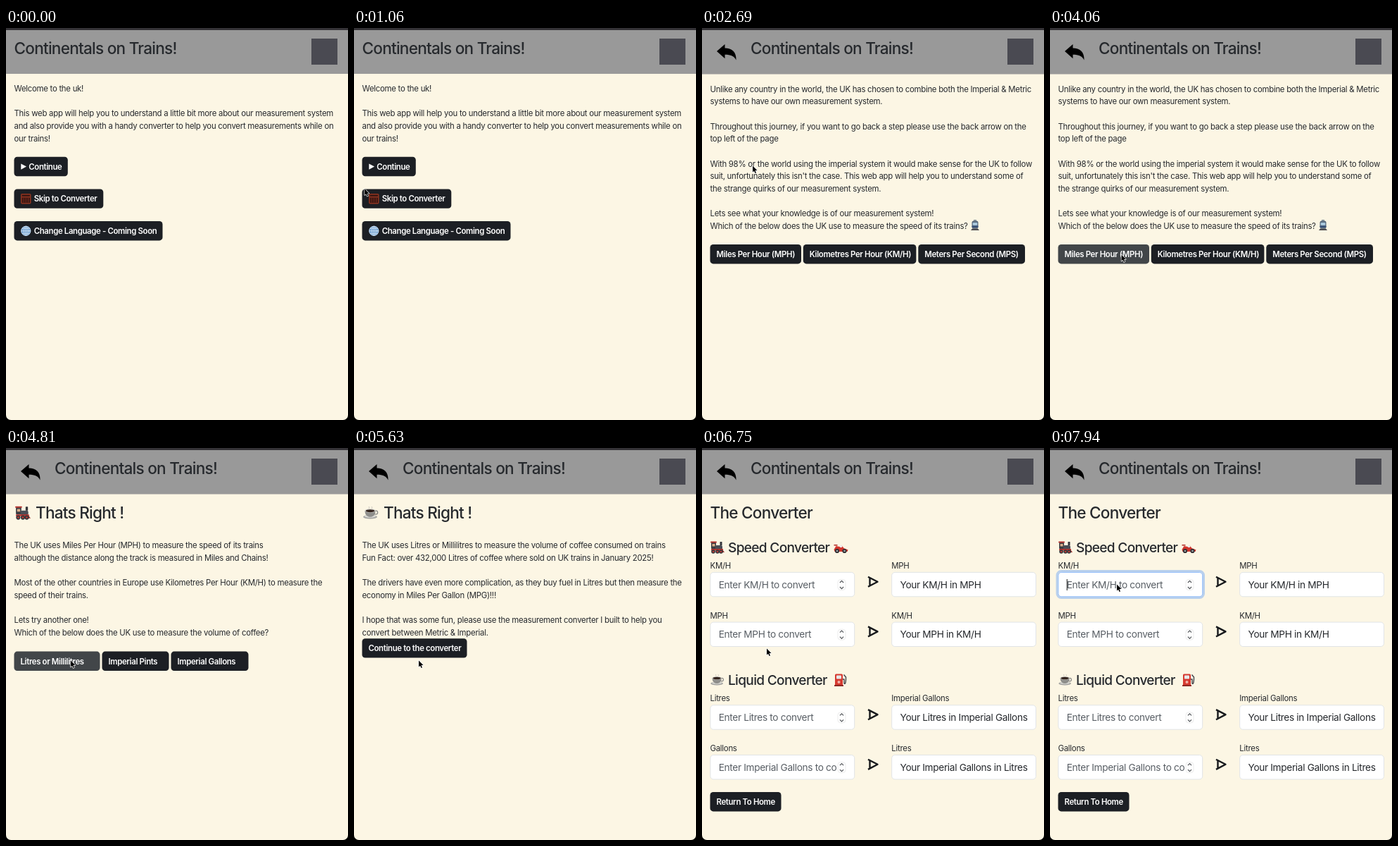
An HTML page with a canvas that plays this animation: 486x556 px, repeating every 8000 ms.

```html
<!DOCTYPE html>
<html lang="en">
<head>
<meta charset="utf-8">
<title>Rail measurement guide</title>
<style>
html, body { margin: 0; width: 100%; height: 100%; overflow: hidden; background: #000; }
canvas { display: block; width: 486px; height: 556px; }
</style>
</head>
<body>
<canvas id="stage"></canvas>
<script>
const W = 486, H = 556, LOOP = 8000, LINE = 17.68;
const canvas = document.getElementById('stage');
const ctx = canvas.getContext('2d');
const dpr = window.devicePixelRatio || 1;
canvas.width = W * dpr;
canvas.height = H * dpr;

const INK = '#26292d', CREAM = '#fcf6e4';

// font size, weight, tracking in em
const STYLES = {
  body: [11.4, 400, -0.0235],
  button: [11.4, 600, -0.031],
  title: [22.6, 500, -0.034],
  section: [19.1, 500, -0.036],
  input: [13.7, 400, -0.0255]
};

function text(str, x, y, style = 'body', color = INK) {
  const [size, weight, track] = STYLES[style];
  ctx.font = `${weight} ${size}px Inter, sans-serif`;
  ctx.letterSpacing = `${size * track}px`;
  ctx.fillStyle = color;
  ctx.fillText(str, x, y);
}

function lines(list, y) {
  list.forEach((s, i) => s && text(s, 11.5, y + i * LINE));
}

function box(x, y, w, h, r, fill, stroke, width = 1) {
  ctx.beginPath();
  ctx.roundRect(x, y, w, h, r);
  if (fill) { ctx.fillStyle = fill; ctx.fill(); }
  if (stroke) { ctx.strokeStyle = stroke; ctx.lineWidth = width; ctx.stroke(); }
}

function oval(x, y, rx, ry, fill) {
  ctx.beginPath();
  ctx.ellipse(x, y, rx, ry, 0, 0, 7);
  ctx.fillStyle = fill;
  ctx.fill();
}

function path(d, fill, stroke, width = 1) {
  const p = new Path2D(d);
  if (fill) { ctx.fillStyle = fill; ctx.fill(p); }
  if (stroke) { ctx.strokeStyle = stroke; ctx.lineWidth = width; ctx.stroke(p); }
}

// Icons are drawn around their own centre
const icons = {
  play() { path('M-3.7-4.1L4 0L-3.7 4.1Z', '#fff'); },
  abacus() {
    box(-6.5, -6.5, 13, 13, 1, '#3a1712', '#8f3420', 1.5);
    path('M-6-2.5H6', null, '#a33d25', 1.2);
    path('M-3.2-1.5V5.5M0-1.5V5.5M3.2-1.5V5.5', null, '#7a2b1c');
  },
  globe() {
    oval(0, 0, 7, 7, '#6f9fd0');
    ctx.beginPath();
    ctx.ellipse(0, 0, 6.6, 6.6, 0, 0, 7);
    ctx.ellipse(0, 0, 3, 6.6, 0, 0, 7);
    ctx.strokeStyle = '#d5e6f5';
    ctx.lineWidth = 0.8;
    ctx.stroke();
    path('M-6.6 0H6.6M0-6.6V6.6M-5.5-3.5H5.5M-5.5 3.5H5.5', null, '#d5e6f5', 0.8);
  },
  tram() {
    box(-4.5, -6.5, 9, 11, 2.5, '#56697c');
    box(-3.3, -4, 6.6, 4, 1, '#a9c8dc');
    box(-4.5, 0.8, 9, 1.6, 0, '#2f4a78');
    path('M-4 4.5L-6 7H6L4 4.5', '#4b4b4f');
    path('M-2-7.2H2', null, '#56697c', 1.2);
  },
  coffee() {
    oval(-1, 5.8, 10, 2.8, '#a3a3a0');
    oval(-1, 5, 8, 1.8, '#d9d9d5');
    ctx.beginPath();
    ctx.ellipse(7, -0.5, 2.6, 2.6, 0, 0, 7);
    ctx.strokeStyle = '#8f8f8c';
    ctx.lineWidth = 1.4;
    ctx.stroke();
    path('M-8.5-3C-8.5 3-5 5.8-1 5.8S6.5 3 6.5-3Z', '#8e8e8b');
    oval(-1, -3, 7.5, 2.7, '#cfcfcb');
    oval(-1, -2.8, 6.4, 2, '#34251e');
    path('M-3-6q1.5-1.5 0-3M1-6q1.5-1.5 0-3', null, '#c9c6bd');
  },
  engine() {
    box(-9, -7, 7, 9, 1, '#3b3d43');
    box(-7.5, -5, 4, 3.5, 0.5, '#d9b08c');
    box(-10, -8.5, 9, 2, 1, '#b3322d');
    box(-3, -3, 10, 6, 2, '#4a4d55');
    box(3.5, -8, 3, 5, 0.5, '#33353a');
    box(-9, 2, 17, 2.4, 0.5, '#bb342e');
    path('M7 3L10 7H5Z', '#9c2c28');
    [-6, 0, 5].forEach(x => { oval(x, 6, 2.8, 2.8, '#34363b'); oval(x, 6, 1.3, 1.3, '#bb3a33'); });
  },
  racer() {
    path('M-10 2L-7-3L-2-2L1-4L4 0L10 2.5L9 5H-9Z', '#d2352c');
    path('M-10-5H-5V-3.5H-10Z', '#b02922');
    oval(0, -2.5, 2, 1.8, '#eee');
    [-5.5, 5].forEach(x => { oval(x, 4, 3.1, 3.1, '#2f3034'); oval(x, 4, 1.3, 1.3, '#a5a7ab'); });
  },
  pump() {
    box(-7.5, -8.5, 11, 17, 1.5, '#d63a30');
    box(-5.5, -6.5, 7, 5, 0.8, '#e6e8e9');
    box(-8.5, 7, 13, 2, 0.5, '#8d2621');
    path('M3.5-1H5.5V5Q7.5 7 8-0.5V-4L5-7.5', null, '#42444a', 1.4);
    oval(-2, 3, 2, 2, '#f1b3a9');
  },
  back() {
    path('M-14-1.5L-2.5-11.5V-6C7-6 14-1 13.5 11C10.5 5 6 3.2-2.5 3.2V8.8Z', '#000');
  },
  convert() {
    path('M-5.5-7.3L8-0.3L-5.5 6.8M-3-6V5.4', null, '#17191c', 2.4);
  }
};

function icon(name, x, y, scale = 1) {
  ctx.save();
  ctx.translate(x, y);
  ctx.scale(scale, scale);
  ctx.lineJoin = 'round';
  icons[name]();
  ctx.restore();
}

const clamp = v => Math.max(0, Math.min(1, v));

const FOCUS_AT = 7540;

function input(x, y, label, hint, editable, focus = 0) {
  text(label, x, y - 5);
  if (focus) box(x - 1.5, y - 1.5, 208.5, 38, 6, null, `rgba(13,110,253,${0.28 * focus})`, 3);
  box(x + 0.4, y + 0.4, 204.8, 34.4, 4.4, '#fff', focus ? '#86b7fe' : '#dee2e6', 0.9);
  ctx.save();
  ctx.beginPath();
  ctx.rect(x, y, editable ? 180.5 : 205, 35);
  ctx.clip();
  text(hint, x + 12.2, y + 22.6, 'input', editable ? '#595f65' : INK);
  ctx.restore();
  if (!editable) return;
  box(x + 181.5, y + 10.5, 11, 15, 4, '#fff', '#e4e4e4', 0.7);
  const cx = x + 187, cy = y + 18;
  path(`M${cx - 2.6} ${cy - 3}l2.6-2.6l2.6 2.6M${cx - 2.6} ${cy + 3}l2.6 2.6l2.6-2.6`, null, '#55585c', 1.2);
  if (focus) { ctx.fillStyle = '#111'; ctx.fillRect(x + 12.2, y + 10, 1, 16); }
}

function field(y, from, to, fromHint, toHint, focus) {
  input(11.5, y, from, fromHint, true, focus);
  icon('convert', 241.5, y + 14);
  input(269.3, y, to, toHint, false);
}

// Buttons: x, y, width, label, optional icon
const pages = [
  {
    start: 0, hand: true,
    buttons: [
      [11.5, 182.8, 76.3, 'Continue', 'play'],
      [11.5, 228.4, 126.8, 'Skip to Converter', 'abacus'],
      [11.5, 274, 211, 'Change Language - Coming Soon', 'globe']
    ],
    draw() {
      lines(['Welcome to the uk!', '',
        'This web app will help you to understand a little bit more about our measurement system',
        'and also provide you with a handy converter to help you convert measurements while on',
        'our trains!'], 90);
    }
  },
  {
    start: 2500,
    buttons: [
      [11.5, 307, 129.5, 'Miles Per Hour (MPH)'],
      [143.8, 307, 160.6, 'Kilometres Per Hour (KM/H)'],
      [307.3, 307, 151.7, 'Meters Per Second (MPS)']
    ],
    draw() {
      lines(['Unlike any country in the world, the UK has chosen to combine both the Imperial & Metric',
        'systems to have our own measurement system.', '',
        'Throughout this journey, if you want to go back a step please use the back arrow on the',
        'top left of the page', '',
        'With 98% or the world using the imperial system it would make sense for the UK to follow',
        "suit, unfortunately this isn't the case. This web app will help you to understand some of",
        'the strange quirks of our measurement system.', '',
        'Lets see what your knowledge is of our measurement system!',
        'Which of the below does the UK use to measure the speed of its trains?'], 90.5);
      icon('tram', 388, 280);
    }
  },
  {
    start: 4130,
    buttons: [
      [11.5, 288.6, 122, 'Litres or Millilitres'],
      [136.5, 288.6, 95, 'Imperial Pints'],
      [234.5, 288.6, 110, 'Imperial Gallons']
    ],
    draw() {
      icon('engine', 24, 92, 1.1);
      text('Thats Right !', 42, 100, 'title');
      lines(['The UK uses Miles Per Hour (MPH) to measure the speed of its trains',
        'although the distance along the track is measured in Miles and Chains!', '',
        'Most of the other countries in Europe use Kilometres Per Hour (KM/H) to measure the',
        'speed of their trains.', '',
        'Lets try another one!',
        'Which of the below does the UK use to measure the volume of coffee?'], 142);
    }
  },
  {
    start: 4940,
    buttons: [[11.5, 270.2, 149, 'Continue to the converter']],
    draw() {
      icon('coffee', 24, 92);
      text('Thats Right !', 42, 100, 'title');
      lines(['The UK uses Litres or Millilitres to measure the volume of coffee consumed on trains',
        'Fun Fact: over 432,000 Litres of coffee where sold on UK trains in January 2025!', '',
        'The drivers have even more complication, as they buy fuel in Litres but then measure the',
        'economy in Miles Per Gallon (MPG)!!!', '',
        'I hope that was some fun, please use the measurement converter I built to help you',
        'convert between Metric & Imperial.'], 142);
    }
  },
  {
    start: 6560,
    buttons: [[11.5, 488, 101, 'Return To Home']],
    draw(t) {
      text('The Converter', 11.5, 100, 'title');
      icon('engine', 22, 141);
      text('Speed Converter', 37, 147.8, 'section');
      icon('racer', 197.5, 142);
      field(176, 'KM/H', 'MPH', 'Enter KM/H to convert', 'Your KM/H in MPH', clamp((t - FOCUS_AT) / 150));
      field(246.7, 'MPH', 'KM/H', 'Enter MPH to convert', 'Your MPH in KM/H');
      icon('coffee', 22, 329, 0.88);
      text('Liquid Converter', 37, 336, 'section');
      icon('pump', 196.5, 329);
      field(364.4, 'Litres', 'Imperial Gallons', 'Enter Litres to convert', 'Your Litres in Imperial Gallons');
      field(435.1, 'Gallons', 'Litres', 'Enter Imperial Gallons to convert', 'Your Imperial Gallons in Litres');
    }
  }
];

// Pointer tip: time, x, y
const MOVES = [
  [900, 3, 235], [1500, 71, 196], [2500, 71, 196], [2650, 72, 195.5], [3250, 72, 195.5],
  [3950, 101.5, 321.5], [4300, 101.5, 321.5], [4650, 92, 301.5], [5690, 92, 301.5],
  [6050, 92, 284.5], [6900, 92, 284.5], [7450, 95, 193.5]
];

function pointer(t) {
  if (t < MOVES[0][0]) return null;
  const i = MOVES.findIndex(m => m[0] > t);
  if (i < 0) return MOVES[MOVES.length - 1].slice(1);
  const [t0, x0, y0] = MOVES[i - 1], [t1, x1, y1] = MOVES[i];
  const u = (t - t0) / (t1 - t0), e = u * u * (3 - 2 * u);
  return [x0 + (x1 - x0) * e, y0 + (y1 - y0) * e];
}

const BUTTON_H = 27.4;

function over([x, y, w], p) {
  return !!p && p[0] >= x && p[0] <= x + w && p[1] >= y && p[1] <= y + BUTTON_H;
}

// Averaging the last 150 ms gives the colour transition
function hoverLevel(b, t, start) {
  let n = 0;
  for (let i = 0; i < 6; i++) {
    const s = t - i * 30;
    if (s >= start && over(b, pointer(s))) n++;
  }
  return n / 6;
}

function button(b, level) {
  const [x, y, w, label, mark] = b;
  const c = [28, 31, 36].map((v, i) => Math.round(v + ([66, 70, 73][i] - v) * level));
  box(x, y, w, BUTTON_H, 4.4, `rgb(${c})`);
  if (mark) icon(mark, x + (mark === 'play' ? 13.5 : 16.8), y + 13.8);
  const indent = !mark ? 9 : mark === 'play' ? 20.8 : 28.2;
  text(label, x + indent, y + 18, 'button', '#fff');
}

function header(withBack) {
  ctx.fillStyle = '#999';
  ctx.fillRect(0, 0, W, withBack ? 65.5 : 65);
  ctx.fillStyle = '#343236';
  ctx.fillRect(0, 0, W, 3);
  if (withBack) icon('back', 35, 34.5);
  text('Continentals on Trains!', withBack ? 69 : 11.5, 37, 'title');
  box(434, 15, 37, 37, 0, '#4a4a52');
}

function drawPointer([x, y], hand) {
  ctx.save();
  ctx.translate(x, y);
  ctx.lineJoin = 'round';
  if (hand) {
    path('M0 0Q1.2-1.2 2 .3L3 4L6 4.5Q7.3 5 7 7L6.2 11H1.5L-2 6.5Q-2-.0 .8 6Z', '#fff', '#111', 1);
  } else {
    const arrow = 'M0 0V9L2 7.2L3.6 10.6L5 10L3.6 6.6H6.4Z';
    path(arrow, '#000', '#fff', 1.3);
    path(arrow, '#000');
  }
  ctx.restore();
}

function render(t) {
  const index = pages.findLastIndex(p => t >= p.start);
  const page = pages[index], p = pointer(t);
  ctx.setTransform(dpr, 0, 0, dpr, 0, 0);
  ctx.fillStyle = '#000';
  ctx.fillRect(0, 0, W, H);
  box(0, 0, W, H, [0, 0, 7, 7], CREAM);
  header(index > 0);
  page.draw(t);
  page.buttons.forEach(b => button(b, hoverLevel(b, t, page.start)));
  if (p) drawPointer(p, page.hand && page.buttons.some(b => over(b, p)));
}

const begin = performance.now();
function tick() {
  render((performance.now() - begin) % LOOP);
  requestAnimationFrame(tick);
}
tick();
</script>
</body>
</html>
```
